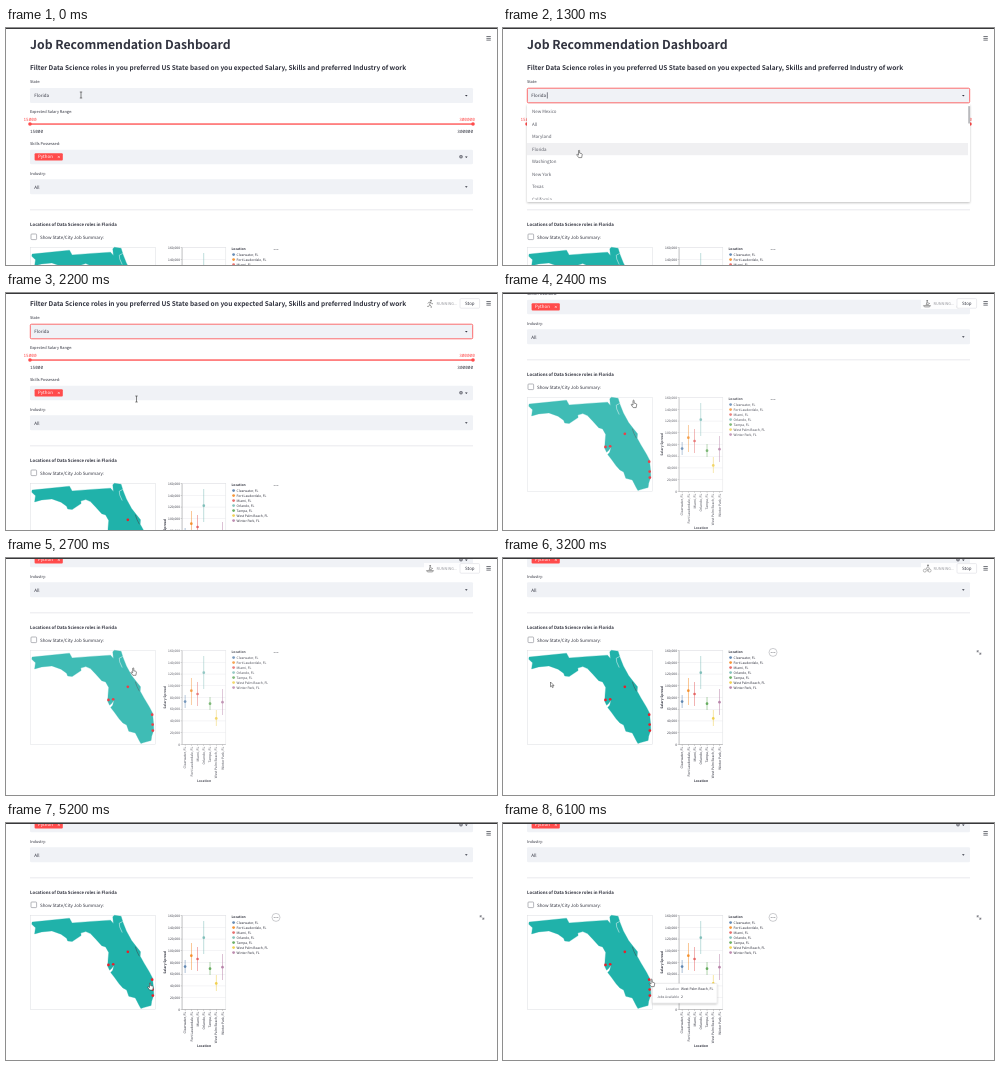
Write an HTML page that moves like this. It is 491x237 px and loops after 7000 ms.

```html
<!DOCTYPE html>
<html lang="en">
<head>
<meta charset="utf-8">
<title>Job dashboard</title>
<style>
  html, body { margin: 0; width: 100%; height: 100%; overflow: hidden; background: #fff; }
  svg { display: block; width: 100vw; height: 100vh; }
  text {
    font-family: "Noto Sans CJK JP", "Noto Sans CJK SC", "Noto Sans CJK", "Open Sans", sans-serif;
    font-size: 4.45px; fill: #31333f; text-rendering: geometricPrecision; white-space: pre;
  }
  .b { font-weight: 700; }
  .label { font-size: 3.9px; }
  .chart { font-size: 3.3px; }
  .soft { fill: #5c5e68; }
  .mono { font: 4.36px "Noto Sans Mono", "DejaVu Sans Mono", monospace; }
  .red { fill: #ff4b4b; }
  .white { fill: #fff; }
  .end { text-anchor: end; }
  .mid { text-anchor: middle; }
</style>
</head>
<body>
<svg id="stage" viewBox="0 0 491 237"></svg>
<script>
const LOOP = 7000, STEP = 100;
const text = (x, y, s, cls = '', extra = '') => `<text x="${x}" y="${y}" class="${cls}" ${extra}>${s}</text>`;
const rect = (x, y, w, h, fill, extra = '') =>
  `<rect x="${x}" y="${y}" width="${w}" height="${h}" fill="${fill}" ${extra}/>`;
const dot = (x, y, r, fill, extra = '') => `<circle cx="${x}" cy="${y}" r="${r}" fill="${fill}" ${extra}/>`;
const path = (d, stroke, width = 0.5, fill = 'none') =>
  `<path d="${d}" stroke="${stroke}" stroke-width="${width}" fill="${fill}" stroke-linejoin="round"/>`;
const group = (id, body, extra = '') => `<g id="${id}" ${extra}>${body}</g>`;
const field = (y, h = 15) =>
  rect(24, y, 443, h, '#f0f2f6', 'rx="1.2"') + path(`M459 ${y + h / 2 - .4}h2.6l-1.3 1.5z`, 'none', 0, '#31333f');

// Form
const form =
  text(24, 20.5, 'Job Recommendation Dashboard', 'b', 'style="font-size:12.25px"') +
  text(24, 42.4, 'Filter Data Science roles in you preferred US State based on you expected Salary, Skills and preferred Industry of work', 'b', 'style="font-size:6.54px"') +
  text(24, 55.3, 'State:', 'label') + field(60) +
  rect(24.3, 60.2, 442.4, 14.6, 'none', 'id="focus" stroke="#ff4b4b" stroke-width=".8" rx="1.2"') +
  text(28.3, 69.2, 'Florida') +
  rect(43.9, 64.3, .6, 6.2, '#31333f', 'id="caret"') +
  text(24, 85.4, 'Expected Salary Range:', 'label') +
  text(24, 92.7, '15000', 'mono red mid') + text(461, 92.7, '300000', 'mono red mid') +
  rect(24, 95.4, 443, 1.3, '#ff4b4b') + dot(24, 96, 1.8, '#ff4b4b') + dot(467, 96, 1.8, '#ff4b4b') +
  text(24, 105, '15000', 'mono') + text(467, 105, '300000', 'mono end') +
  text(24, 117, 'Skills Possessed:', 'label') + field(121.8, 14.4) +
  rect(28.6, 125.2, 28.2, 7.4, '#ff4b4b', 'rx="1"') + text(32, 130.4, 'Python', 'white') +
  path('M51.8 127.9l2 2m0-2l-2 2', '#fff', .5) +
  dot(455, 128.8, 1.8, '#6b6d77') + path('M454.3 128.1l1.4 1.4m0-1.4l-1.4 1.4', '#fff', .4) +
  text(24, 146.6, 'Industry:', 'label') + field(151.2) + text(28.3, 160.6, 'All') +
  rect(24, 181.6, 443, .6, '#d9dae0') +
  text(24, 197.7, 'Locations of Data Science roles in Florida', 'b', 'style="font-size:4.34px"') +
  rect(25, 206, 5.6, 5.6, '#fff', 'rx=".8" stroke="#85868f" stroke-width=".6"') +
  text(34, 210.6, 'Show State/City Job Summary:');

// Albers equal-area projection (parallels 29.5 and 45.5, meridian -96), fitted to the map box
function project([lon, lat]) {
  const rad = Math.PI / 180, s1 = Math.sin(29.5 * rad), n = (s1 + Math.sin(45.5 * rad)) / 2;
  const rho = Math.sqrt(1 - s1 * s1 + 2 * n * (s1 - Math.sin(lat * rad))) / n;
  const theta = n * (lon + 96) * rad;
  return [970 * rho * Math.sin(theta) - 95.3, 970 * rho * Math.cos(theta) - 1270.6];
}
const trace = points => 'M' + points.map(p => project(p).map(v => v.toFixed(1)).join(' ')).join('L');
const coast = [
  [-87.6, 31], [-85, 31], [-84.86, 30.71], [-83.5, 30.65], [-82.21, 30.57], [-82.05, 30.36], [-82.02, 30.75],
  [-81.9, 30.82], [-81.45, 30.71], [-81.38, 30.3], [-81.25, 29.8], [-81, 29.2], [-80.75, 28.8], [-80.53, 28.46],
  [-80.6, 28.2], [-80.42, 27.75], [-80.16, 27.17], [-80.03, 26.8], [-80.08, 26.2], [-80.13, 25.8], [-80.33, 25.45],
  [-80.42, 25.2], [-80.9, 25.15], [-81.1, 25.12], [-81.17, 25.3], [-81.35, 25.8], [-81.75, 25.95], [-81.83, 26.35],
  [-82.05, 26.5], [-82.25, 26.75], [-82.5, 27.2], [-82.7, 27.5], [-82.55, 27.62], [-82.42, 27.9], [-82.62, 27.72],
  [-82.75, 27.65], [-82.84, 27.9], [-82.75, 28.3], [-82.65, 28.7], [-82.8, 29.05], [-83.05, 29.15], [-83.4, 29.6],
  [-83.7, 29.95], [-84, 30.1], [-84.35, 30.05], [-84.35, 29.9], [-85, 29.62], [-85.3, 29.68], [-85.35, 29.85],
  [-85.7, 30.12], [-86.3, 30.37], [-87, 30.37], [-87.5, 30.29], [-87.4, 30.65], [-87.63, 30.87]
];
const river = [[-81.4, 30.39], [-81.65, 30.32], [-81.66, 30.1], [-81.55, 29.75]];
const lagoon = [[-80.82, 28.8], [-80.76, 28.5], [-80.65, 28.2]];
const markers = [[-82.78, 27.97], [-82.46, 27.97], [-81.37, 28.57], [-80.07, 26.71], [-80.15, 26.12], [-80.2, 25.77]];
const map =
  rect(24.3, 92.6, 125.4, 93.8, '#fff', 'stroke="#dcdde1" stroke-width=".5"') +
  path(trace(coast) + 'Z', '#20b2aa', .3, '#20b2aa') +
  path(trace(river), '#d5efee', .6) + path(trace(lagoon), '#3c5f60', .7) +
  markers.map(p => dot(...project(p), 1.35, '#e8202c')).join('');

// Chart: name, colour, point, top and bottom of the spread
const cities = [
  ['Clearwater', '#4c78a8', 143.6, 137, 150],
  ['Fort Lauderdale', '#f58518', 132.7, 120, 147],
  ['Miami', '#e45756', 136, 124, 148],
  ['Orlando', '#72b7b2', 114.7, 98, 131],
  ['Tampa', '#54a24b', 145.7, 139, 152],
  ['West Palm Beach', '#eeca3b', 160.4, 152, 168],
  ['Winter Park', '#b279a2', 144.2, 131, 157]
];
let chart = rect(176, 92.6, 43.8, 93.8, '#fff', 'stroke="#dcdde1" stroke-width=".5"');
for (let i = 0; i <= 8; i++) {
  const y = 186.4 - i * 11.725;
  chart += rect(176, y - .2, 43.8, .4, '#e3e4e8') + rect(174.6, y - .2, 1.4, .4, '#999') +
    text(174, y + 1.2, (i * 20000).toLocaleString('en-US'), 'chart end');
}
chart += rect(175.8, 92.6, .5, 93.8, '#999') + rect(175.8, 186.2, 44, .5, '#999');
cities.forEach(([name, color, y, top, bottom], i) => {
  const x = 179.1 + i * 6.23, row = 99.6 + i * 5;
  chart += rect(x - .35, top, .7, bottom - top, color, 'opacity=".65"') + dot(x, y, 1.35, color, 'opacity=".85"') +
    rect(x - .2, 186.4, .4, 1.5, '#999') +
    text(0, 0, name + ', FL', 'chart end', `transform="translate(${x + 1.2} 188.8) rotate(-90)"`) +
    dot(227.6, row, 1.4, color, 'opacity=".85"') + text(230.6, row + 1.2, name + ', FL', 'chart');
});
chart +=
  text(0, 0, 'Salary Spread', 'chart b mid', 'transform="translate(160 139.5) rotate(-90)"') +
  text(198, 224.4, 'Location', 'chart b mid') + text(225.5, 95, 'Location', 'chart b');
const dots = [268.2, 270, 271.8].map(x => dot(x, 94.4, .5, '#77797f')).join('');

// State menu
const states = ['New Mexico', 'All', 'Maryland', 'Florida', 'Washington', 'New York', 'Texas', 'California'];
const menu =
  rect(24, 76, 443, 98, '#fff', 'rx="1.2" filter="url(#shadow)"') +
  rect(24, 115, 441, 12.2, '#f0f0f2', 'id="hover"') +
  `<g clip-path="url(#menuClip)">${states.map((s, i) => text(29, 85 + i * 12.5, s, 'soft')).join('')}</g>` +
  rect(465.2, 78, 1.8, 17.5, '#b9babd', 'rx=".6"');

// Header status
const runner = dot(425, 7.6, .9, '#777') + path('M424.6 9l-1 2.8l1.6 1.2v2M423.6 11.8l-.9 1.6h-1.6M421.8 10.6l1.1-1.4l2 .2l.9 1.3h1.2', '#777', .7);
const rower = dot(424.2, 7.8, .9, '#777') + path('M424 9l-.8 2.6h2.6M424 9.6l3 1M420.5 12.6h7l-1 1.3h-5z', '#777', .7);
const biker = dot(425, 7.5, .9, '#777') + path('M424.6 8.8l-1.4 1.8l1.6 1v1.8M424.6 9.2l1.4 1h1', '#777', .6) +
  dot(421.8, 12.6, 1.5, 'none', 'stroke="#777" stroke-width=".5"') + dot(426.6, 12.6, 1.5, 'none', 'stroke="#777" stroke-width=".5"');
const status =
  rect(418, 5, 58, 11, '#fff', 'opacity=".85"') +
  group('runner', runner) + group('rower', rower) + group('biker', biker) +
  text(430.5, 12.3, 'RUNNING...', 'label', 'opacity=".5"') +
  rect(454, 5.6, 19.6, 9.6, '#fff', 'rx="1" stroke="#d6d7dc" stroke-width=".5"') + text(463.8, 11.8, 'Stop', 'mid');

const tooltip =
  rect(149.3, 160.5, 64.7, 19.6, '#fff', 'rx=".8" stroke="#d8d9dc" stroke-width=".4" filter="url(#shadow)"') +
  text(176, 167.4, 'Location', 'chart soft end') + text(178, 167.4, 'West Palm Beach, FL', '', 'style="font-size:3.4px"') +
  text(176, 174.7, 'Jobs Available', 'chart soft end') + text(178, 174.7, '2', '', 'style="font-size:3.4px"');

const beam = path('M-1.2-3h2.4M0-3v6M-1.2 3h2.4', '#333', .6);
const hand = path('M-.5 0q.6-.6 1.1 0v2.6l2 .5q.7.3.6 1.1l-.5 2.9h-3l-2-2.7q0-.8.7-.6l1.1.8z', '#222', .5, '#fff');
const arrow = path('M0 0v4.8l1.1-1l.8 1.8l.9-.4l-.8-1.7h1.5z', '#222', .5, '#fff');

stage.innerHTML =
  `<defs><filter id="shadow" x="-5%" y="-10%" width="110%" height="125%">
    <feDropShadow dx="0" dy="1" stdDeviation="1.2" flood-opacity=".25"/></filter>
    <clipPath id="menuClip">${rect(24, 76, 441, 95.8, '#000')}</clipPath></defs>` +
  rect(0, 0, 491, 237, '#fff') +
  group('page', form +
    group('results', group('plots', map + chart) + dots +
      group('tools', dot(270, 94.4, 4, 'none', 'stroke="#9a9ca3" stroke-width=".5"') +
        path('M475.8 92.8h-1.6v1.6M474.2 92.8l1.5 1.5M476.2 96.2h1.6v-1.6M477.8 96.2l-1.5-1.5', '#44464f', .6)),
      'transform="translate(0 127)"') +
    group('menu', menu)) +
  group('tip', tooltip) + group('status', status) +
  [8.5, 10.3, 12.1].map(y => rect(480.4, y - .4, 4.4, .8, '#55575f')).join('') +
  rect(0, 0, 491, 1, '#39393b') +
  group('cursor', group('beam', beam) + group('hand', hand) + group('arrow', arrow));

// Piecewise linear motion: keys are [time, ...values]
function track(keys, t) {
  const i = keys.findIndex(k => k[0] > t);
  if (i < 0) return keys[keys.length - 1].slice(1);
  const [a, b] = [keys[i - 1], keys[i]], p = (t - a[0]) / (b[0] - a[0]);
  return a.slice(1).map((v, n) => v + (b[n + 1] - v) * p);
}
const scrollKeys = [[0, 0], [1900, 0], [2200, 29], [2400, 115], [2500, 127]];
const cursorKeys = [
  [0, 75, 67], [400, 75, 67], [800, 76, 105], [900, 76, 108], [1100, 76, 122.5], [1500, 76, 122.5],
  [1900, 105, 112], [2200, 130.5, 106], [2400, 130.5, 107.5], [2900, 125, 112], [3200, 47.5, 124],
  [3500, 42, 125], [3800, 62, 130], [4200, 111, 140], [4600, 131, 132], [5000, 141, 150],
  [5400, 147, 170], [5700, 148, 162], [6000, 148.5, 156.5]
];
const menuKeys = [[0, 0], [200, 0], [400, 1], [1500, 1], [1700, 0]];
const dimKeys = [[0, 1], [2200, 1], [2400, .86], [2800, .86], [3000, 1]];

const $ = id => document.getElementById(id);
const show = (id, on) => $(id).setAttribute('visibility', on ? 'inherit' : 'hidden');
const within = (t, from, to) => t >= from && t < to;

function draw(now) {
  const t = Math.floor(now % LOOP / STEP) * STEP;
  const [x, y] = track(cursorKeys, t), [open] = track(menuKeys, t);
  $('page').setAttribute('transform', `translate(0 ${-track(scrollKeys, t)[0]})`);
  $('cursor').setAttribute('transform', `translate(${x} ${y})`);
  $('menu').setAttribute('opacity', open);
  $('plots').setAttribute('opacity', track(dimKeys, t)[0]);
  $('hover').setAttribute('y', t < 1000 ? 102.5 : 115);
  show('focus', t >= 200);
  show('caret', within(t, 300, 800) || within(t, 1300, 1600));
  const beamOn = t < 500 || within(t, 1900, 2300), arrowOn = within(t, 3000, 4000);
  show('beam', beamOn);
  show('arrow', arrowOn);
  show('hand', !beamOn && !arrowOn);
  show('status', within(t, 1700, 3700));
  show('runner', t < 2400);
  show('rower', within(t, 2400, 2900));
  show('biker', t >= 2900);
  show('tools', t >= 3000);
  show('tip', t >= 5900);
  requestAnimationFrame(draw);
}
requestAnimationFrame(draw);
</script>
</body>
</html>
```
